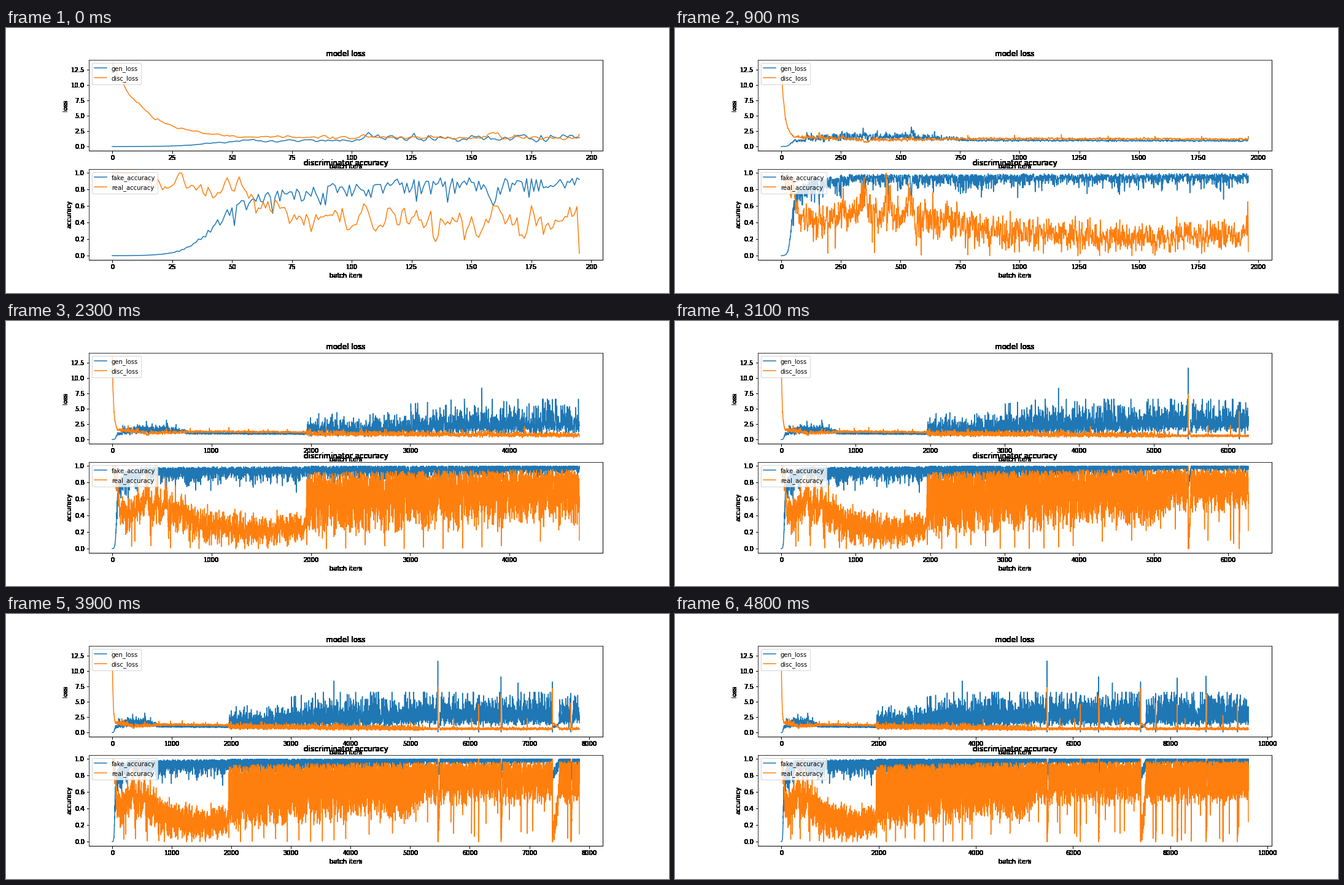
A matplotlib script for the animation above (4900 ms loop, 1080 by 432 pixels).

```python
import numpy as np
import matplotlib.pyplot as plt
from matplotlib.animation import FuncAnimation

EPOCH, FRAMES = 196, 49
N = EPOCH * FRAMES
SHIFT = 1957  # the training regime changes here
rng = np.random.default_rng(12)
step = np.arange(N)


def curve(*knots):
    return np.interp(step, knots[::2], knots[1::2])


def sigmoid(center, width):
    return 1 / (1 + np.exp(-np.clip((step - center) / width, -50, 50)))


def bump(center, width, height):
    return height * np.exp(-((step - center) / width) ** 2)


def noise():
    """White noise with a little short-term drift."""
    white = rng.standard_normal(N)
    return .8 * white + .35 * np.convolve(white, np.ones(3), "same")


def make_gen():
    level = sigmoid(39, 7) * curve(0, .9, 95, 1, 110, 1.35, 330, 1.55, 600, 1.55, 800, 1.02,
                                   SHIFT, .95, SHIFT + 5, 1.65, 2500, 1.5, 3500, 2.3,
                                   5300, 2.8)
    level += bump(107, 2, .7) + bump(345, 10, .6) + bump(446, 5, .8) + bump(550, 8, .4)
    sigma = curve(0, .06, 90, .1, 130, .18, 600, .15, 850, .06, SHIFT, .06, SHIFT + 5, .33,
                  3500, .35, 5300, .28)
    return np.minimum(level * np.exp(sigma * noise()), curve(0, 2.8, SHIFT, 4.2, 3500, 6.6))


def make_disc():
    level = 12 * np.exp(-step / 13.5) + curve(0, 1.5, 130, 1.5, 300, 1.15, 550, 1.1, 850, 1.32,
                                              SHIFT, 1.22, SHIFT + 10, .95, 4000, .77,
                                              5300, .62, N, .6)
    level += bump(159, 3, 1) + bump(262, 8, .4) - bump(355, 15, .4) + bump(545, 4, .8)
    sigma = curve(0, .01, 40, .04, 130, .09, 600, .08, 850, .05, SHIFT, .05, SHIFT + 5, .18,
                  4000, .22, 5100, .22, 5300, .12)
    return level * np.exp(sigma * noise())


def make_fake():
    level = sigmoid(42, 6) * curve(0, .75, 60, .78, 85, .86, 120, .95, 300, .99, SHIFT, 1,
                                   SHIFT + 5, 1.01)
    level -= bump(158, 3, .2) + bump(545, 3, .25)
    drop = curve(0, .06, 130, .06, 300, .035, SHIFT, .03, 3000, .035, 4000, .025, 5300, .012)
    return level * (1 - drop * rng.gamma(1.9, 1, N))


def make_real():
    level = curve(0, 1, 10, 1, 18, .83, 50, .83, 67, .47, 195, .42, 330, .52, 600, .47,
                  900, .29, 1400, .23, 1930, .24, SHIFT, .4)
    level += bump(262, 10, .12) + bump(345, 15, .25) + bump(450, 10, .2) + bump(540, 15, .15)
    sigma = curve(0, 0, 10, .01, 25, .06, 200, .09, 600, .09, 1000, .075, SHIFT, .065)
    high = curve(SHIFT, .93, 4000, .96, N, .98)
    low = curve(SHIFT, .05, 2700, .08, 3600, .18, 5000, .2, 5300, .42)
    mixed = high - (high - low) * rng.beta(1.2, 2.2, N)
    return np.where(step < SHIFT, level + sigma * noise(), mixed)


gen, disc, fake, real = make_gen(), make_disc(), make_fake(), make_real()

# The short last batch of each epoch upsets the discriminator.
ends = np.arange(EPOCH - 1, N, EPOCH)
real[ends] = rng.random(FRAMES) * np.where(ends < 4000, .05, .38)
disc[ends[ends < 3200]] += .5


def collapse(at, length, g, d):
    """A loss spike followed by a slow recovery."""
    t = np.linspace(0, 1, length)
    wobble = rng.standard_normal(length)
    span = slice(at, at + length)
    gen[span] = .95 + .7 * t ** 3 + .08 * wobble
    disc[span] = 1.6 - .8 * t + .06 * wobble
    real[span] = .08 + .6 * t ** 1.6 + .07 * wobble
    fake[span] = .78 + .18 * t + .03 * wobble
    gen[at - 1:at + 2] = g * .6, g, .1
    disc[at - 1:at + 2] = d * .5, d, d * .4
    real[at - 1:at + 2] = .2, 0, 1


for event in ((5465, 34, 11.65, 7.35), (6150, 8, 6.1, 4.6), (6525, 28, 9.1, 6),
              (7388, 115, 8.25, 7.2), (7697, 26, 6.4, 4.8), (8140, 24, 8.9, 4.6),
              (8735, 26, 9.2, 6.2), (9080, 16, 6, 2.8), (9380, 16, 5.2, 4.5)):
    collapse(*event)

# Brief disturbances without a collapse.
for at in (5730, 6030, 6965, 8300):
    disc[at:at + 6] = np.linspace(2.3, .8, 6)
    real[at:at + 6] = np.linspace(.1, .6, 6)
gen[[3722, 6808]] = 8.4, 8.1

fake, real = np.clip(fake, 0, 1), np.clip(real, 0, 1)


def solid(img, dpi):
    """Turn every touched pixel fully black, giving hard-edged text."""
    out = np.zeros_like(img)
    out[..., 3] = img[..., 3] > 0
    return out, 0, 0


def panel(ax, title, ylabel, ylim, **series):
    ax.set(title=title, xlabel="batch iters", ylabel=ylabel, ylim=ylim)
    plots = [(ax.plot([], [], lw=1.5, label=name)[0], data) for name, data in series.items()]
    ax.legend(loc="upper left")
    for artist in (ax.title, ax.xaxis, ax.yaxis):
        artist.set_agg_filter(solid)
    for side in ("right", "bottom"):
        ax.spines[side].set_linewidth(1)
    return plots


plt.rcParams["font.family"] = "DejaVu Sans"
fig, (loss_ax, acc_ax) = plt.subplots(2, 1, figsize=(15, 6), dpi=72, facecolor="white")
fig.subplots_adjust(left=.125, right=.9, bottom=.125, top=.88, hspace=.2)
plots = panel(loss_ax, "model loss", "loss", (-.67, 14.12), gen_loss=gen, disc_loss=disc)
plots += panel(acc_ax, "discriminator accuracy", "accuracy", (-.05, 1.05),
               fake_accuracy=fake, real_accuracy=real)


def update(frame):
    n = EPOCH * (frame + 1)
    for line, data in plots:
        line.set_data(step[:n], data[:n])
    for ax in (loss_ax, acc_ax):
        ax.set_xlim(-.05 * (n - 1), 1.05 * (n - 1))
    return [line for line, _ in plots]


anim = FuncAnimation(fig, update, frames=FRAMES, interval=100, init_func=lambda: update(0),
                     blit=False, repeat=True)
plt.show()
```
